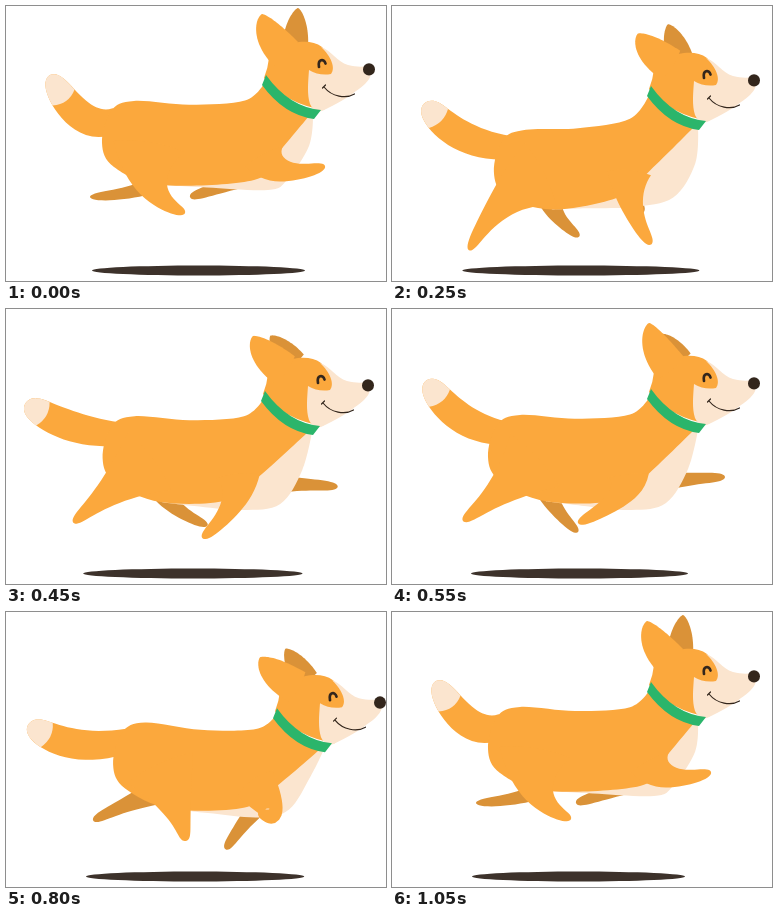
These frames come from a looping animation (380x275 px, 1100 ms). An HTML page:

```html
<!DOCTYPE html>
<html lang="en">
<head>
<meta charset="utf-8">
<title>Running dog</title>
<style>
  html, body { margin: 0; width: 100%; height: 100%; overflow: hidden; background: #fff; }
  svg { display: block; width: 100vw; height: 100vh; }
  .coat { fill: #fba83d; }
  .shade { fill: #da9238; }
  .cream { fill: #fbe5cf; }
  .ink { fill: #33261c; }
  .line { fill: none; stroke: #33261c; stroke-linecap: round; }
</style>
</head>
<body>
<svg viewBox="0 0 380 275">
  <ellipse id="shadow" cy="264.5" ry="5" fill="#3d322b"/>
  <path id="tail" class="coat"/>
  <path id="tailTip" class="cream"/>
  <path id="farHind" class="shade"/>
  <path id="farFore" class="shade"/>
  <path id="chest" class="cream"/>
  <path id="torso" class="coat"/>
  <path id="nearHind" class="coat"/>
  <path id="nearFore" class="coat"/>
  <g id="head">
    <path id="farEar" class="shade"/>
    <path class="coat" d="M263 52C270 40 300 29 316 41L330 56 318 104Q280 98 258 72 262 62 263 52z"/>
    <path class="cream" d="M315 41C325 44 331 56 342 59 350 61 356 61 362 60 370 68 361 78 350 85 342 92 330 98 316 105Q308 107 304 98C301 88 302 78 303 64Q313 70 325 68C330 62 325 50 315 41z"/>
    <path id="nearEar" class="coat"/>
    <path fill="#2bb56b" d="M260 69Q283 101 315 104L308 113Q278 109 256 79z"/>
    <ellipse class="ink" cx="363" cy="63.4" rx="6" ry="6.2"/>
    <path class="line" stroke-width="2.7" d="M313 61C311.500 53 318 52 319.500 57.500"/>
    <path class="line" stroke-width="1.2" d="M316.500 82L319.500 79M318 81C326 91 340 93 348.500 88"/>
  </g>
</svg>
<script>
const LOOP = 1100, STEP = 50;
const TIMES = [0, 150, 350, 550, 700, 900, 1050];

// Key joints, one x,y per pose; a missing last pose repeats the first.
const KEYS = {
  shadow:   '86,299 68,316 74,298 79,296 79,302 81,294 80,293', // left and right edge
  head:     '0,0 -1,5 -1,15 -1,11 11,32 11,18 -1,1',
  rump:     '128,95 137,136 130,110 128,106 140,116 137,102',
  elbow:    '248,174 238,191 220,191 225,191 228,203 248,184',
  breast:   '303,140 309,150 297,162 296,160 303,175 306,148',
  tailMid:  '77,111 80,130 57,126 68,108 66,136 72,124',
  tailEnd:  '44,69 62,74 5,116 35,71 22,116 25,102',
  nearStifle: '148,182 122,212 103,184 108,182 146,208 185,184',
  nearHeel: '179,207 101,268 66,218 71,212 160,251 188,207',
  farStifle: '140,181 155,218 170,198 162,196 125,203 122,180',
  farHeel:  '84,191 149,249 208,212 186,223 98,229 83,188',
  nearKnee: '280,165 262,196 226,205 224,190 238,214 287,181',
  nearPaw:  '319,160 299,225 218,244 186,214 186,238 319,161',
  farKnee:  '222,178 212,203 282,183 288,171 265,218 222,196',
  farPaw:   '184,191 178,214 328,193 333,168 271,260 187,207',
  nearEarTip: '256,8 256,8 238,25 258,3 250,5 239,30',
  farEarTip: '292,2 292,2 262,13 270,14 273,6 264,13'
};

const tracks = {};
for (const name in KEYS) {
  const rows = KEYS[name].split(' ').map(pair => pair.split(',').map(Number));
  if (rows.length < TIMES.length) rows.push(rows[0]);
  tracks[name] = rows;
}

const el = id => document.getElementById(id);
const text = p => p.map(v => v.toFixed(2)).join(' ');
const move = (p, x, y) => [p[0] + x, p[1] + y];
const mix = (a, b, u) => a + (b - a) * u;
const middle = (a, b) => [mix(a[0], b[0], .5), mix(a[1], b[1], .5)];

// Smooth interpolation that never overshoots a pose.
function sample(rows, t) {
  const last = TIMES.length - 1;
  let k = 0;
  while (k < last - 1 && t >= TIMES[k + 1]) k++;
  const h = TIMES[k + 1] - TIMES[k], u = (t - TIMES[k]) / h;
  return [0, 1].map(i => {
    const slope = n => {
      n = (n + last) % last;
      return (rows[n + 1][i] - rows[n][i]) / (TIMES[n + 1] - TIMES[n]);
    };
    const tangent = n => {
      const a = slope(n - 1), b = slope(n);
      return a * b > 0 ? 2 * a * b / (a + b) : 0;
    };
    return mix(rows[k][i], rows[k + 1][i], u * u * (3 - 2 * u))
      + h * u * (1 - u) * ((1 - u) * tangent(k) - u * tangent(k + 1));
  });
}

// Closed smooth curve through the points, with sharp corners where listed.
function blob(points, corners) {
  const n = points.length;
  const pull = points.map((p, i) => {
    if (corners.includes(i)) return [0, 0];
    const a = points[(i + n - 1) % n], b = points[(i + 1) % n];
    return [(b[0] - a[0]) / 6, (b[1] - a[1]) / 6];
  });
  return 'M' + text(points[0]) + points.map((p, i) => {
    const j = (i + 1) % n, q = points[j];
    const c1 = move(p, ...pull[i]), c2 = move(q, -pull[j][0], -pull[j][1]);
    return 'C' + [c1, c2, q].map(text).join(' ');
  }).join('') + 'z';
}

// Band around the parabola a, b, c with half width width(u), from u = start to 1.
function ribbon([a, b, c], width, start = 0) {
  const blend = (p, q, r) => [0, 1].map(i => a[i] * p + b[i] * q + c[i] * r);
  const spine = u => blend((1 - u) * (1 - 2 * u), 4 * u * (1 - u), u * (2 * u - 1));
  const left = [], right = [];
  for (let i = 0; i <= 24; i++) {
    const u = mix(start, 1, Math.sin(i / 24 * Math.PI / 2));
    const p = spine(u), [dx, dy] = blend(4 * u - 3, 4 - 8 * u, 4 * u - 1);
    const s = width(u) / Math.hypot(dx, dy);
    left.push(move(p, -dy * s, dx * s));
    right.unshift(move(p, dy * s, -dx * s));
  }
  return 'M' + left.concat(right).map(text).join('L')
    + 'Q' + text(spine(start - .08)) + ' ' + text(left[0]) + 'z';
}

const cap = u => Math.sqrt(1 - u ** 14);
const limb = (thick, thin) => u => (thin + (thick - thin) * (1 - u) ** 1.8) * cap(u);
const leaf = size => u => size * (1 - u * u) ** .7;
const brush = u => (12 + 3 * Math.sin(Math.PI * u)) * cap(u);

function draw(t) {
  const pose = Math.min(t, TIMES[TIMES.length - 1]);
  const j = {};
  for (const name in tracks) j[name] = sample(tracks[name], pose);
  const { head, rump, elbow, breast } = j;
  const put = (id, d) => el(id).setAttribute('d', d);

  const nape = move(head, 259, 76), throat = move(head, 303, 110);
  const withers = move(nape, -20, 11 + .4 * (rump[1] - nape[1]));
  const groin = [rump[0] + 26, mix(rump[1] + 87, elbow[1], .37)];
  put('torso', blob([
    nape, withers, move(middle(withers, rump), 0, 4), rump,
    move(rump, -23, 10), move(rump, -32, 42), move(rump, -20, 66),
    groin, elbow, move(middle(elbow, throat), -6, 8), throat
  ], [0, 10]));
  put('chest', blob([
    move(head, 307, 110), breast, move(breast, -22, 34), move(elbow, 14, 10),
    move(middle(groin, elbow), 0, 5), groin, middle(elbow, nape)
  ], [0, 5]));

  const tail = [move(rump, -16, 18), j.tailMid, j.tailEnd];
  put('tail', ribbon(tail, brush));
  put('tailTip', ribbon(tail, brush, .79));

  put('nearHind', ribbon([move(rump, 15, 45), j.nearStifle, j.nearHeel], limb(36, 6)));
  put('farHind', ribbon([move(rump, 25, 65), j.farStifle, j.farHeel], limb(15, 5)));
  put('nearFore', ribbon([move(elbow, 10, -24), j.nearKnee, j.nearPaw], limb(22, 6)));
  put('farFore', ribbon([move(elbow, 25, -15), j.farKnee, j.farPaw], limb(13, 5)));

  const ear = (id, root, tip, bend, size) =>
    put(id, ribbon([root, move(middle(root, tip), bend, 0), tip], leaf(size)));
  ear('nearEar', [280, 48], j.nearEarTip, -4, 17);
  ear('farEar', [289, 41], j.farEarTip, 0, 13);

  const [left, right] = j.shadow;
  el('shadow').setAttribute('cx', (left + right) / 2);
  el('shadow').setAttribute('rx', (right - left) / 2);
  el('head').setAttribute('transform', `translate(${text(head)})`);
}

const start = performance.now();
function tick() {
  const t = (performance.now() - start) % LOOP;
  draw(Math.floor(t / STEP) * STEP);
  requestAnimationFrame(tick);
}
tick();
</script>
</body>
</html>
```
